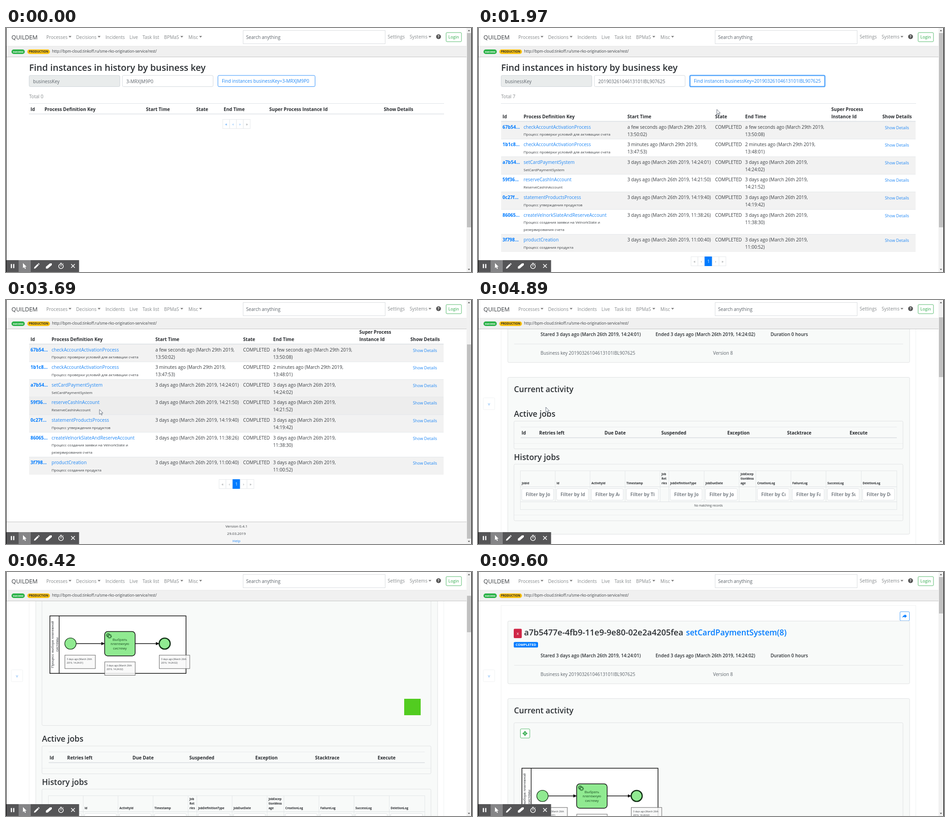
Animation of 1017 by 535 pixels, one loop 9.78 s. Source, as an HTML page:

```html
<!DOCTYPE html>
<html lang="en">
<head>
<meta charset="utf-8">
<title>Find instances by business key</title>
<style>
html, body { margin: 0; width: 100%; height: 100%; overflow: hidden; background: #fff; }
svg { display: block; font-family: "Open Sans", "Noto Sans", sans-serif; fill: #3a3e42; }
#stage { width: 100%; height: 100%; }
.bold { font-weight: 700; fill: #282b2f; }
.semi { font-weight: 600; fill: #2c3034; }
.link { fill: #2088f6; }
.muted { fill: #868a8c; }
.field { fill: #5d646b; }
.white { fill: #fff; }
.mid { text-anchor: middle; }
.bpmn { font-family: "Liberation Sans", Arial, sans-serif; }
</style>
</head>
<body>
<svg id="stage" viewBox="0 0 1017 535"></svg>
<script>
const LOOP = 9780, DIAGRAM_HEIGHT = 342;
const OLD_KEY = '3-MRXJM9P0', NEW_KEY = '20190326104613101IBL907625';
const BLUE = '#007bff', GREEN = '#28a745', LINE = '#dee2e6', CARD = '#f8faf9';

// Markup helpers: text is placed by its left edge and the middle of its capitals.
const text = (x, cy, s, size = 10.05, cls = '', extra = '') =>
  `<text x="${x}" y="${cy + size * .36}" font-size="${size}" class="${cls}" ${extra}>${s}</text>`;
const lines = (x, cy, s, gap, size, cls) =>
  s.split('|').map((part, i) => text(x, cy + i * gap, part, size, cls)).join('');
const rect = (x, y, w, h, fill, stroke = 'none', r = 0, extra = '') =>
  `<rect x="${x}" y="${y}" width="${w}" height="${h}" fill="${fill}" stroke="${stroke}" rx="${r}" ${extra}/>`;
const path = (d, fill, stroke = 'none', w = 1, extra = '') =>
  `<path d="${d}" fill="${fill}" stroke="${stroke}" stroke-width="${w}" ${extra}/>`;
const hline = (x1, x2, y, color = LINE, w = 1) => path(`M${x1} ${y}H${x2}`, 'none', color, w);
const group = (id, body, extra = '') => `<g id="${id}" ${extra}>${body}</g>`;
const heads = (y, cols, size, cls = 'bold') => cols.map(([x, s]) => text(x, y, s, size, cls)).join('');

function header() {
  const caret = x => path(`M${x} 17.5h6.4l-3.2 3.4z`, '#777');
  const nav = [[88, 'Processes'], [153, 'Decisions'], [217, 'Incidents'], [269.5, 'Live'],
    [298, 'Task list'], [345, 'BPMaS'], [398, 'Misc']];
  return rect(1, 0, 1004, 40, '#fff') + rect(1, 40, 1004, 23, '#f0f0f0') +
    hline(1, 1005, 40, '#e6e6e6') + hline(1, 1005, 63.5, '#c4c4c4') +
    text(12, 20.5, 'QUILDEM', 12.7) + heads(20, nav, 10, 'muted') +
    [136.5, 200, 380.5, 421.5, 922].map(caret).join('') +
    rect(517.5, 5.5, 310, 29, '#fff', '#d9dcdf') + text(524, 20.5, 'Search anything', 10.05, 'field') +
    text(833, 19, 'Settings', 10.05, 'muted') + text(881, 19, 'Systems', 10.05, 'muted') +
    '<circle cx="944" cy="19" r="5.3" fill="#555"/>' + text(944, 19.2, '?', 8, 'bold white mid') +
    rect(960.5, 10, 33.5, 20, '#fff', '#53b96a', 2) + text(977, 20, 'Login', 9.1, 'mid', `style="fill:${GREEN}"`) +
    rect(12, 47, 29, 10, '#2db34a', 'none', 5) + text(26.5, 52, 'success', 6, 'bold white mid') +
    rect(46.5, 47, 49.5, 10, '#fbc211', 'none', 5) + text(71.2, 52, 'PRODUCTION', 6.3, 'bold mid') +
    text(100.5, 51.5, 'http://bpm-cloud.tinkoff.ru/sme-rko-origination-service/rest/', 8.12);
}

function pager(x, y, glyphs, active) {
  return [...glyphs].map((g, i) => {
    const on = i === active, w = on ? 16 : 15, left = x;
    x += w;
    return rect(left, y, w, 20, on ? BLUE : '#fff', on ? BLUE : '#e6e9ec') +
      text(left + w / 2, y + 10, g, 8.5, 'mid ' + (on ? 'white' : active || i === 3 ? 'muted' : 'link'));
  }).join('');
}

const ROWS = [
  ['67b54...', 'checkAccountActivationProcess', 'Процесс проверки условий для активации счета',
    'a few seconds ago (March 29th 2019,|13:50:02)', 'a few seconds ago (March 29th 2019,|13:50:08)'],
  ['1b1c8...', 'checkAccountActivationProcess', 'Процесс проверки условий для активации счета',
    '3 minutes ago (March 29th 2019,|13:47:53)', '2 minutes ago (March 29th 2019,|13:48:01)'],
  ['a7b54...', 'setCardPaymentSystem', 'SetCardPaymentSystem', '14:24:01', '14:24:02'],
  ['59f36...', 'reserveCashInAccount', 'ReserveCashInAccount', '14:21:50', '14:21:52'],
  ['0c27f...', 'statementProductsProcess', 'Процесс утверждения продуктов', '14:19:40', '14:19:42'],
  ['86065...', 'createVelnorkSlateAndReserveAccount',
    'Процесс создания заявки на VelnorkSlate и|резервирования счета', '11:38:26', '11:38:30'],
  ['3f798...', 'productCreation', 'Процесс создания продукта', '11:00:40', '11:00:52']
];
const rowTop = i => 205 + i * 38.6 + (i > 5 ? 15.8 : 0);

function resultRow([id, name, note, start, end], i) {
  const y = rowTop(i), when = (s, sep) => s.length > 8 ? s : `3 days ago (March 26th 2019,${sep}${s})`;
  return rect(50.5, y, 904.5, rowTop(i + 1) - y, '#fff', 'none', 0, 'class="row"') + hline(50.5, 955, y, '#e4e7ea') +
    text(53.5, y + 12, id, 10.05, 'bold', `style="fill:${BLUE}"`) + text(99.5, y + 12, name, 10.05, 'link') +
    lines(99.5, y + 28.5, note, 15.8, 8) + lines(326, y + 12, when(start, ' '), 16, 10.05) +
    text(517.5, y + 12, 'COMPLETED') + lines(583, y + 12, when(end, '|'), 16, 10.05) +
    text(888, y + 13.5, 'Show Details', 8.85, 'link');
}

function searchPage() {
  const empty = hline(50, 956, 188.5, LINE, 1.4) +
    heads(178, [[53.5, 'Id'], [84, 'Process Definition Key'], [305.5, 'Start Time'], [415, 'State'],
      [475, 'End Time'], [574.5, 'Super Process Instance Id'], [824.5, 'Show Details']]) +
    pager(473, 200.5, '«‹›»');
  const results = lines(771, 178, 'Super Process|Instance Id', 16, 10.05, 'bold') +
    heads(194, [[53.5, 'Id'], [99.5, 'Process Definition Key'], [326, 'Start Time'], [517.5, 'State'],
      [583, 'End Time'], [882.5, 'Show Details']]) +
    ROWS.map(resultRow).join('') + hline(50.5, 955, 204.5, LINE, 1.4) + pager(465, 501.5, '«‹1›»', 2);
  return text(50.5, 87, 'Find instances in history by business key', 19.8, 'semi') +
    rect(50.5, 104, 198, 24.5, '#e9ecec', '#cfd5da', 2.6) + text(59, 117, 'businessKey', 10.05, 'field') +
    rect(254, 104, 198, 24.5, '#fff', '#d3d8dd', 2.6, 'id="input"') +
    text(262.5, 117, OLD_KEY, 10, 'field', 'id="key"') +
    group('spell', hline(359, 407.5, 122.5, '#e0354a')) +
    rect(462.5, 104, 212, 24.5, '#fff', BLUE, 2.6, 'id="button"') +
    text(471, 116.5, '', 9.97, '', 'id="label"') +
    text(50.5, 150, 'Total 0', 10.05, 'muted', 'id="total"') + hline(50, 956, 165.5) +
    group('empty', empty) + group('results', results) +
    rect(1, 594, 1004, 60, '#f5f5f5') + hline(1, 1005, 594.5, '#c4c4c4') +
    text(503, 604.5, 'Version 0.4.1', 8, 'mid') + text(503, 620.5, '29.03.2019', 8, 'mid') +
    text(503, 636, 'Help', 8, 'mid link');
}

function diagram() {
  const arrow = (x1, x2) => hline(x1, x2 - 6, 491, '#111', 1.4) + path(`M${x2} 491l-8 -3.4v6.8z`, '#111');
  const stamp = (x, y, time) => rect(x, y, 66.5, 29.5, '#f8f8f8', '#666', 0, 'fill-opacity=".85"') +
    lines(x + 4, y + 8.5, `3 days ago (March 26th|2019, ${time})`, 8, 5.1);
  const gear = (x, y, r) => `<circle cx="${x}" cy="${y}" r="${r}" fill="none" stroke="#1d5a26" stroke-width="1.6" stroke-dasharray="1.6 1"/>` +
    `<circle cx="${x}" cy="${y}" r="${r - 1.4}" fill="#8ee68f" stroke="#1d5a26" stroke-width=".8"/>`;
  const cross = 'M98.5 354h8M102.5 350v8M97.8 354l2-1.7v3.4zM107.2 354l-2-1.7v3.4zM102.5 349.3l-1.7 2h3.4zM102.5 358.7l-1.7-2h3.4z';
  return rect(78.5, 330.5, 849, 340, CARD, '#e1e3e4', 2.6) +
    rect(92.5, 344, 20.5, 20, '#fff', '#53b96a', 2) + path(cross, GREEN, GREEN, 1.2) +
    rect(95.8, 430.3, 297, 126, '#fff', '#111', 0, 'stroke-width="1.5"') + path('M116 430V556', 'none', '#111', 1.4) +
    `<g transform="translate(0 493) rotate(-90)">${text(0, 101, 'Процесс выбора платежной', 7.95, 'bpmn mid')}${text(0, 111, 'системы', 7.95, 'bpmn mid')}</g>` +
    '<circle cx="140.7" cy="491" r="12.4" fill="#90ea91" stroke="#1b3b1e" stroke-width="1.4"/>' +
    '<circle cx="346.3" cy="491" r="12" fill="#90ea91" stroke="#123016" stroke-width="2.6"/>' +
    rect(215.3, 464.5, 66.5, 53.5, '#90ea91', '#111', 6.6, 'stroke-width="1.5"') +
    gear(223, 472.5, 3.8) + gear(226, 475, 4) +
    ['Выбрать', 'платежную', 'систему'].map((s, i) =>
      text(248.5, 481.7 + i * 9.6, s, 7.95, 'bpmn mid', 'style="fill:#28602f"')).join('') +
    arrow(153, 216) + arrow(282, 335) +
    stamp(128.5, 516.3, '14:24:01') + stamp(215.5, 531, '14:24:02') + stamp(334.5, 516.3, '14:24:02') +
    rect(869, 612, 36, 36, '#52cc20');
}

function jobs() {
  const names = ['JobId', 'Id', 'ActivityId', 'Timestamp', 'Job|Ret|ries', 'JobDefinitionType', 'JobDueDate',
    'JobExcep|tionMess|age', 'CreationLog', 'FailureLog', 'SuccessLog', 'DeletionLog'];
  const edges = [92.5, 168.5, 244.5, 321, 397.5, 416.5, 493.5, 570, 606.5, 683, 759.5, 836.5, 914];
  const column = (name, i) => {
    const x = edges[i], wide = !name.includes('|');
    return path(`M${x} 482V550`, 'none', '#e3e6e8') + lines(x + 3, wide ? 509.5 : 490, name, 9.7, 6.4, 'bold') +
      (wide ? rect(x + 3, 521.5, 69.5, 25.5, '#fff', '#dfe2e5', 2.6) +
        `<svg x="${x + 11}" y="522" width="53.5" height="24">${text(.5, 12.5, 'Filter by ' + name, 10.2, 'bold', 'style="fill:#7d8389"')}</svg>` : '');
  };
  return text(78.5, 357.5, 'Active jobs', 17.4, 'semi') + rect(78.5, 373.5, 849, 61, 'none', '#e1e3e4', 2.6) +
    hline(93, 914, 386.5, '#e8eaec') + hline(93, 914, 410, '#d9dde0', 1.3) + hline(79, 927, 422.5, '#eceeef') +
    heads(399, [[95, 'Id'], [133.5, 'Retries left'], [276, 'Due Date'], [400, 'Suspended'],
      [544, 'Exception'], [674.5, 'Stacktrace'], [811, 'Execute']]) +
    text(78.5, 452.5, 'History jobs', 17.4, 'semi') + rect(78.5, 468, 849, 124, 'none', '#e1e3e4', 2.6) +
    rect(92.5, 482.5, 821.5, 85, 'none', '#e3e6e8') + names.map(column).join('') +
    [517.5, 550.5].map(y => hline(92.5, 914, y, '#dfe2e5')).join('') + hline(79, 927, 579.5, '#eceeef') +
    text(503, 559, 'No matching records', 6.4, 'mid');
}

function detailPage() {
  return rect(50.5, 73.5, 905, 2000, '#fff', '#f0f1f1') +
    rect(921, 87, 20.5, 20, '#fff', '#469ffb', 2) +
    path('M926.5 100.5c0-4 2-5.5 4.8-5.5v-2.3l4.7 4-4.7 4v-2.4c-2.2 0-3.6.3-4.8 2.2z', BLUE) +
    rect(65, 107.5, 877, 137.5, CARD, '#dfe1e2', 2.6) +
    rect(78, 124.5, 17.5, 20.5, '#cf2646', 'none', 2) + text(86.8, 135, 'x', 9.5, 'white mid') +
    text(100.5, 133, 'a7b5477e-4fb9-11e9-9e80-02e2a4205fea', 18, 'semi') +
    text(454, 133, 'setCardPaymentSystem(8)', 17.3, 'semi', `style="fill:${BLUE}"`) +
    rect(78, 153.5, 53, 12, BLUE, 'none', 2.6) + text(104.5, 159.5, 'COMPLETED', 7.5, 'bold white mid') +
    heads(183, [[136.5, 'Stared 3 days ago (March 26th 2019, 14:24:01)'],
      [387.5, 'Ended 3 days ago (March 26th 2019, 14:24:02)'], [638.5, 'Duration 0 hours']], 10, 'semi') +
    hline(79, 928, 204.5, '#e3e5e6') +
    text(136.5, 224.5, 'Business key ' + NEW_KEY, 9.95, 'field') + text(513, 224.5, 'Version 8', 10, 'field') +
    rect(65, 277.5, 877, 344, CARD, '#dfe1e2', 2.6, 'id="card"') +
    text(78.5, 303.5, 'Current activity', 17.4, 'semi') +
    group('diagram', diagram()) + group('jobs', jobs());
}

function toolbar() {
  return rect(1, 509, 158.5, 26, '#555557') + rect(27.5, 509, 26.5, 26, '#858587') +
    path('M10.5 517.5h2.6v9h-2.6zM15.6 517.5h2.6v9h-2.6z', '#fff') +
    path('M37 515.5v11l2.7-2.3 1.8 4 1.8-.8-1.8-3.9h3.4z', '#fff') +
    path('M61 527.7l.8-3.3 7.2-7.2 2.5 2.5-7.2 7.2zM69.8 516.4l1.2-1.2 2.5 2.5-1.2 1.2z', '#fff') +
    path('M87 523.5l9-7.5h4v3.8l-9 7.6h-4z', '#fff') +
    '<circle cx="120" cy="522.5" r="5" fill="none" stroke="#fff" stroke-width="1.5"/>' +
    path('M118 515.6h4M120 519.5v3.5M124 517.5l1-1', 'none', '#fff', 1.4) +
    path('M142.2 517.8l8 8m0-8l-8 8', 'none', '#fff', 1.6);
}

const POINTERS = {
  arrow: path('M0 0V11L2.6 8.6 4.4 12.4 6 11.7 4.3 8H7.6Z', '#fff', '#566070', .9),
  hand: path('M0 0c1 0 1.2.6 1.2 1.2V4.5l4.5 1c.8.2 1 .8 1 1.5L6 10.5l-1 2h-6L-4 8c-.6-1 .4-1.6 1.2-.9l1.6 1.3V1.2C-1.2.6-1 0 0 0Z', '#fff', '#3c4658', .9),
  beam: path('M-2 -5H2M0 -5V5M-2 5H2', 'none', '#333', .9),
  none: ''
};

document.getElementById('stage').innerHTML =
  rect(0, 0, 1017, 535, '#fff') + group('search', searchPage()) + group('detail', detailPage()) +
  header() + group('side', rect(11.5, 214.5, 25, 26, '#fff', '#f0f2f3', 2) + text(24, 228, 'v', 9, 'mid', 'style="fill:#62acf8"')) +
  rect(1005, 0, 10.5, 535, '#f1f1f1') + path('M1010.3 4l2.5 3h-5zM1010.3 531l2.5-3h-5z', '#606060') +
  rect(1006, 11, 9, 426, '#c1c1c1', 'none', 0, 'id="thumb"') + toolbar() +
  rect(0, 0, 1, 535, '#000') + rect(1015.7, 0, 1.3, 535, '#000') + group('pointer', '');

const BURSTS = [[100, 1120, 9], [1270, 2260, 8], [2400, 3010, 5], [3010, 3430, 4], [3560, 3560, 1],
  [3690, 4400, 5], [4690, 4890, 2], [4890, 5680, 6], [5810, 6420, 5], [6420, 6840, 4], [6960, 7860, 7],
  [8040, 8180, 2], [8790, 8790, 1], [9600, 9600, 1]];
const TICKS = [0, ...BURSTS.flatMap(([a, b, n]) =>
  Array.from({ length: n }, (_, i) => a + (b - a) * i / Math.max(1, n - 1)))];

const POSITION = [[0, 340, 122], [490, 340, 122], [990, 498, 129], [1420, 498, 129], [2260, 545, 229],
  [3010, 545, 229], [3430, 235, 310], [3560, 225, 305], [3690, 204, 240], [4220, 150, 186], [4690, 148, 188],
  [4890, 148, 235], [6960, 148, 235], [7860, 44, 116], [8180, 575, 0], [8789, 575, 0], [8790, 748, 2]];
const POINTER = [[0, 'none'], [100, 'beam'], [600, 'arrow'], [980, 'hand'], [1600, 'arrow'], [4200, 'hand'],
  [4690, 'arrow'], [5900, 'none'], [6960, 'arrow'], [9600, 'none']];
const SCROLL = [[0, 0], [3010, 0], [3430, 108], [5150, 108], [5600, 0], [5680, 0], [5810, 56], [6420, 334],
  [6840, 412], [6900, 412], [7700, 0]];

const latest = (table, t) => table.findLast(row => row[0] <= t);
function tween(table, t) {
  const a = latest(table, t), b = table[table.indexOf(a) + 1] || a;
  const p = a === b ? 0 : (t - a[0]) / (b[0] - a[0]);
  return a.slice(1).map((v, i) => v + (b[i + 1] - v) * p);
}

const $ = id => document.getElementById(id);
const set = (id, attrs) => Object.entries(attrs).forEach(([k, v]) => $(id).setAttribute(k, v));
const show = (id, on) => set(id, { display: on ? 'inline' : 'none' });
const rowEls = [...document.querySelectorAll('.row')];

function draw(t) {
  const [x, y] = tween(POSITION, t), [scroll] = tween(SCROLL, t);
  const kind = latest(POINTER, t)[1];
  const pasted = t >= 480, found = t >= 1540, onDetail = t >= 4690, loaded = t >= 5020;
  const typing = t >= 100 && t < 1270, focused = t >= 1270;

  show('search', !onDetail);
  show('detail', onDetail);
  show('side', onDetail);
  set('search', { transform: `translate(0 ${-scroll})` });
  set('detail', { transform: `translate(0 ${-scroll})` });

  const key = pasted ? NEW_KEY : OLD_KEY;
  $('key').textContent = key;
  $('label').textContent = 'Find instances businessKey=' + key;
  $('total').textContent = found ? 'Total 7' : 'Total 0';
  set('input', { stroke: typing ? '#6db1fa' : '#d3d8dd', 'stroke-width': typing ? 2 : 1 });
  show('spell', pasted && typing);
  const [fill, ink] = t >= 1100 && t < 1270 ? ['#bbdcfe', '#58a6f8']
    : t >= 1270 && t < 1600 ? [BLUE, '#fff'] : ['#fff', '#2088f6'];
  set('button', { width: pasted ? 294.5 : 212, fill, stroke: focused ? '#55a6fb' : '#3392fb', 'stroke-width': focused ? 2.6 : 1 });
  $('label').style.fill = ink;
  show('empty', !found);
  show('results', found);
  rowEls.forEach((el, i) => {
    const over = y + scroll >= rowTop(i) && y + scroll < rowTop(i + 1);
    el.setAttribute('fill', over ? '#ededed' : i % 2 ? '#fff' : '#f2f2f2');
  });

  const extra = loaded ? DIAGRAM_HEIGHT : 0;
  show('diagram', loaded);
  set('card', { height: 344 + extra });
  set('jobs', { transform: `translate(0 ${extra})` });

  const [size, rate] = loaded ? [80, .123] : onDetail ? [131, .25] : [426, .8];
  set('thumb', { y: 11 + scroll * rate, height: size });

  if ($('pointer').dataset.kind !== kind) {
    $('pointer').dataset.kind = kind;
    $('pointer').innerHTML = POINTERS[kind];
  }
  set('pointer', { transform: `translate(${x} ${y})` });
}

const start = performance.now();
function frame() {
  const t = (performance.now() - start) % LOOP;
  draw(TICKS.findLast(tick => tick <= t + .5));
  requestAnimationFrame(frame);
}
frame();
</script>
</body>
</html>
```
